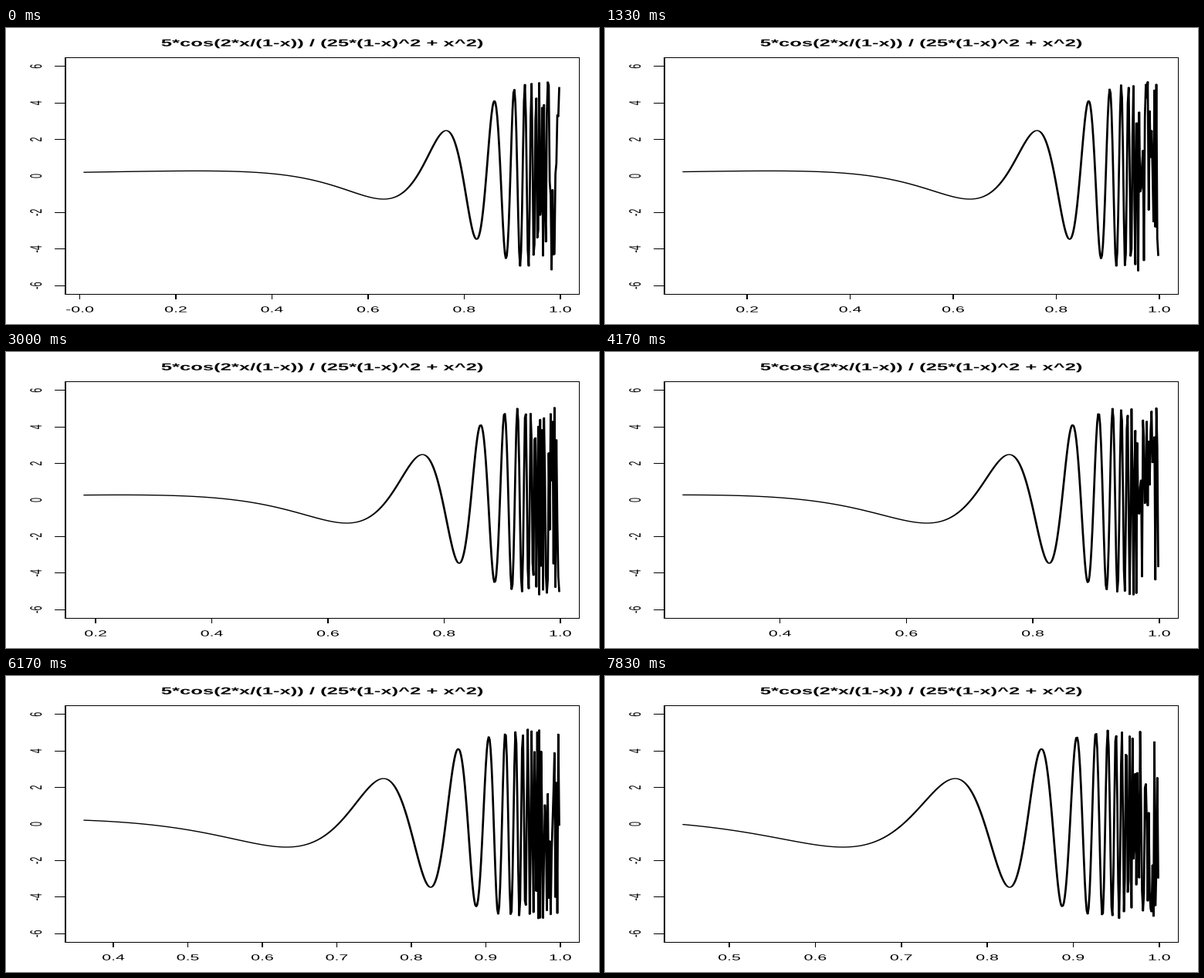
Animation of 768x384 px, one loop 8 s. Source, as a matplotlib script:

```python
import numpy as np
import matplotlib.pyplot as plt
from matplotlib.animation import FuncAnimation
from matplotlib.patches import PathPatch, Rectangle
from matplotlib.path import Path
from matplotlib.textpath import TextPath
from matplotlib.transforms import Affine2D

FRAMES, LOOP = 48, 8000
STEP = 0.0095                # how far the left limit moves per frame
POINTS = 500
SIDE = 480                   # square plot canvas, shown on a 2:1 stage
LEFT, RIGHT, TOP, BOTTOM = 48, 464, 48, 432
LINE = 16                    # height of one margin line
PEN, CURVE_PEN = 1.0, 1.7
LABEL_SIZE, TITLE_SIZE = 40 / 3, 16
TITLE = "5*cos(2*x/(1-x)) / (25*(1-x)^2 + x^2)"

fig = plt.figure(figsize=(7.68, 3.84), dpi=100, facecolor="white")
ax = fig.add_axes([0, 0, 1, 1])
ax.set_xlim(0, SIDE)
ax.set_ylim(SIDE, 0)
ax.axis("off")


def f(x):
    return 5 * np.cos(2 * x / (1 - x)) / (25 * (1 - x) ** 2 + x ** 2)


def scale(v, lo, hi, start, end):
    """Map lo..hi onto start..end, leaving 4 % free on each side."""
    pad = 0.04 * (hi - lo)
    return start + (v - lo + pad) / (hi - lo + 2 * pad) * (end - start)


def to_y(v):
    return scale(v, -6, 6, BOTTOM, TOP)


def bar(x0, y0, x1, y1):
    """A straight axis line with square ends."""
    h = PEN / 2
    return ax.add_patch(Rectangle((x0 - h, y0 - h), x1 - x0 + PEN,
                                  y1 - y0 + PEN, fc="black", lw=0))


def advance(s, size, prop):
    def right(t):
        return TextPath((0, 0), t, size=size, prop=prop).get_extents().x1
    return right("|" + s + "|") - right("||")


def label(s, x, y, size=LABEL_SIZE, weight="normal", upright=True):
    """Text centred on (x, y) along its baseline."""
    prop = dict(family="Liberation Sans", weight=weight)
    path = TextPath((0, 0), s, size=size, prop=prop)
    turn = [[1, 0, x], [0, -1, y]] if upright else [[0, -1, x], [-1, 0, y]]
    place = Affine2D().translate(-advance(s, size, prop) / 2, 0)
    place += Affine2D(np.array(turn + [[0, 0, 1]], float))
    return ax.add_patch(PathPatch(place.transform_path(path),
                                  fc="black", lw=0, snap=False))


def outline(x, y, width):
    """Closed outline of a round-joined stroke along the points."""
    p = np.column_stack([x, y])
    p = np.vstack([p, p[-2:0:-1]])
    d = np.roll(p, -1, axis=0) - p
    after = np.arctan2(d[:, 1], d[:, 0])
    before = np.roll(after, 1)
    half = np.pi + 1e-9
    turn = (after - before + half) % (2 * np.pi) - half
    ang = before[:, None] + turn[:, None] * np.linspace(0, 1, 7)
    ring = p[:, None] + width / 2 * np.stack([-np.sin(ang), np.cos(ang)], -1)
    ring = ring.reshape(-1, 2)
    return Path(np.vstack([ring, ring[:1]]), closed=True)


def x_ticks(lo):
    pad = 0.04 * (1 - lo)
    first, last = lo - pad, 1 + pad
    step = 0.2 if (last - first) / 5 > 0.28 / 1.8 else 0.1
    n = np.arange(np.ceil(first / step), np.floor(last / step) + 1)
    return n * step


for y in (TOP, BOTTOM):
    bar(LEFT, y, RIGHT, y)
for x in (LEFT, RIGHT):
    bar(x, TOP, x, BOTTOM)
for v in range(-6, 7, 2):
    bar(LEFT - LINE / 2, to_y(v), LEFT, to_y(v))
    label(str(v), LEFT - 1.2 * LINE, to_y(v), upright=False)
label(TITLE, (LEFT + RIGHT) / 2, TOP / 2 + 0.345 * TITLE_SIZE,
      TITLE_SIZE, "bold")

curve = ax.add_patch(PathPatch(Path([(0, 0), (0, 0)]), fc="black", lw=0,
                               snap=False))
moving = []


def draw(i):
    while moving:
        moving.pop().remove()
    lo = STEP * (i + 1)

    def to_x(v):
        return scale(v, lo, 1, LEFT, RIGHT)

    # the function has no value at x = 1
    x = np.linspace(lo, 1, POINTS)[:-1]
    curve.set_path(outline(to_x(x), to_y(f(x)), CURVE_PEN))
    for v in x_ticks(lo):
        moving.append(bar(to_x(v), BOTTOM, to_x(v), BOTTOM + LINE / 2))
        moving.append(label(f"{v:.1f}", to_x(v), BOTTOM + 1.8 * LINE))
    return [curve, *moving]


anim = FuncAnimation(fig, draw, frames=FRAMES, interval=LOOP / FRAMES,
                     init_func=lambda: draw(0), repeat=True, repeat_delay=0)
plt.show()
```
